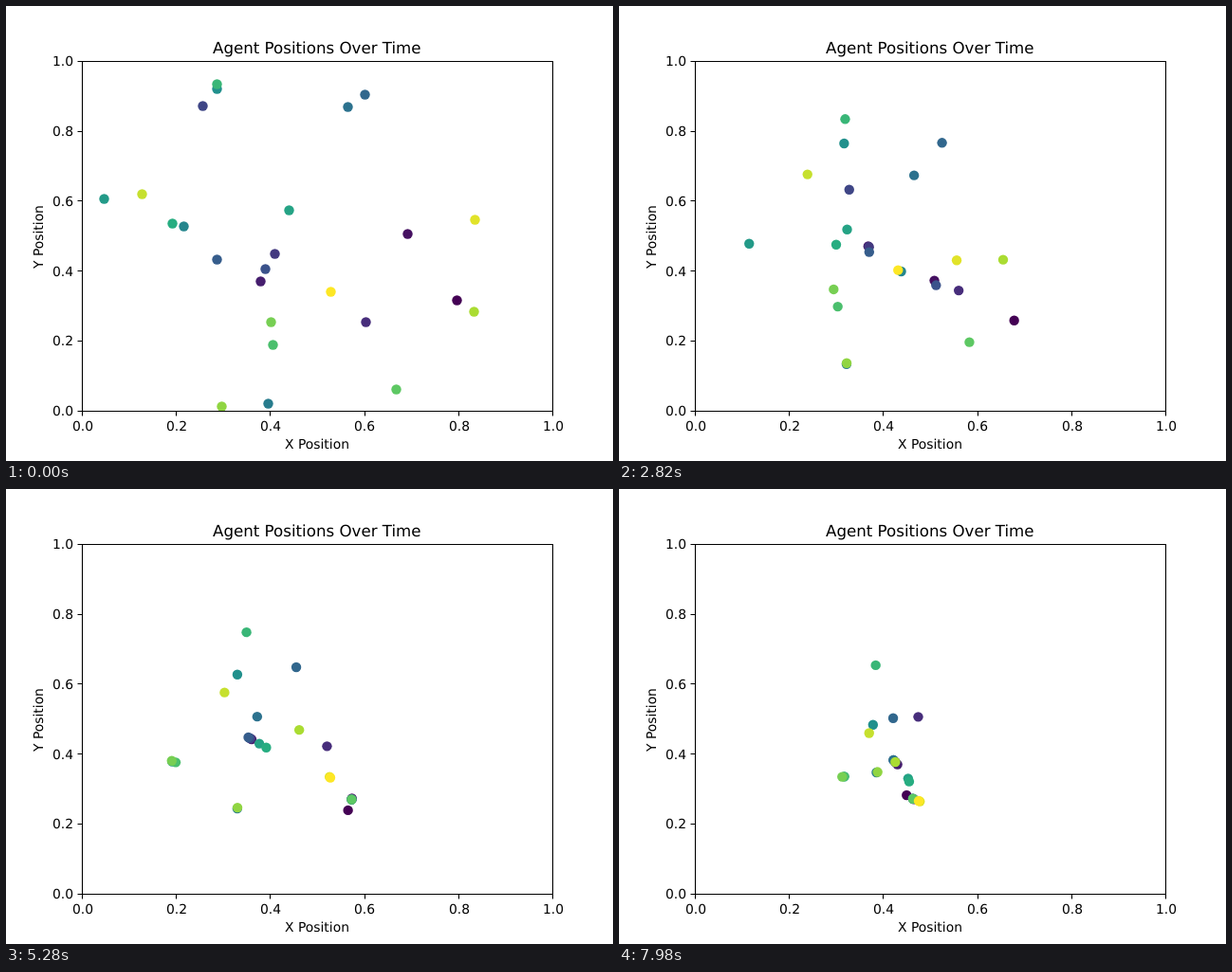
An HTML page for the animation above (8000 ms loop, 640 by 480 pixels).

```html
<!DOCTYPE html>
<html lang="en">
<head>
<meta charset="utf-8">
<title>Agent Positions Over Time</title>
<style>
  html, body { margin: 0; width: 100%; height: 100%; overflow: hidden; background: #fff; }
  svg { display: block; width: 100vw; height: 100vh; }
  text { font: 13.889px "DejaVu Sans", sans-serif; text-rendering: geometricPrecision; }
  .title { font-size: 16.667px; }
  .axes { fill: none; stroke: #000; stroke-width: 1.11; }
</style>
</head>
<body>
<svg viewBox="0 0 640 480"></svg>
<script>
const LOOP = 8000, STEP = 60;
const PLOT = { left: 80, bottom: 427.2, width: 496, height: 369.6 };
const RAMP = ["#440154", "#472d7b", "#3b528b", "#2c728e", "#21908c", "#27ad81", "#5dc863", "#aadc32", "#fde725"];

// Start of the chase: pixel x, pixel y, speed (1e-5 axis units per step), index of the prey
const AGENTS = [
  [475, 310, 281, 20], [423, 240, 510, 6], [268, 290, 224, 14], [379, 333, 213, 16], [283, 261, 215, 2],
  [207, 105, 530, 4], [273, 277, 280, 0], [222, 267, 210, 4], [378, 93, 335, 7], [360, 106, 467, 7],
  [276, 419, 398, 20], [187, 232, 546, 6], [222, 87, 337, 2], [103, 203, 308, 10], [298, 215, 283, 15],
  [175, 229, 263, 11], [222, 82, 223, 24], [281, 357, 319, 13], [411, 404, 340, 6], [279, 333, 303, 13],
  [227, 422, 269, 2], [493, 322, 495, 5], [143, 198, 298, 5], [494, 225, 648, 24], [342, 301, 293, 11]
];

const svg = document.querySelector("svg");

function add(tag, attrs, content = "") {
  const node = document.createElementNS("http://www.w3.org/2000/svg", tag);
  for (const key in attrs) node.setAttribute(key, attrs[key]);
  node.textContent = content;
  return svg.appendChild(node);
}

const toX = x => PLOT.left + x * PLOT.width;
const toY = y => PLOT.bottom - y * PLOT.height;
const snap = v => Math.round(v) + 0.5;

// Colour at position 0..1 along the ramp
function rampColor(position) {
  const place = position * (RAMP.length - 1);
  const low = Math.min(Math.floor(place), RAMP.length - 2);
  const channel = at => {
    const [a, b] = [RAMP[low], RAMP[low + 1]].map(hex => parseInt(hex.slice(at, at + 2), 16));
    return Math.round(a + (b - a) * (place - low));
  };
  return `rgb(${channel(1)}, ${channel(3)}, ${channel(5)})`;
}

// Every agent walks at its own constant speed straight at its prey's current place
function simulate(steps) {
  const agents = AGENTS.map(([px, py, speed, prey]) => ({
    x: (px + 0.5 - PLOT.left) / PLOT.width,
    y: (PLOT.bottom - py - 0.5) / PLOT.height,
    speed: speed / 1e5,
    prey
  }));
  const history = [];
  for (let i = 0; i < steps; i++) {
    history.push(agents.map(a => [toX(a.x), toY(a.y)]));
    for (const a of agents) {
      const prey = agents[a.prey];
      const dx = prey.x - a.x, dy = prey.y - a.y;
      const distance = Math.hypot(dx, dy);
      const part = distance > a.speed ? a.speed / distance : 1;
      a.x += dx * part;
      a.y += dy * part;
    }
  }
  return history;
}

const dots = AGENTS.map((_, i) => add("circle", { r: 5.2, fill: rampColor(i / (AGENTS.length - 1)) }));

let axes = `M${snap(toX(0))} ${snap(toY(0))}H${snap(toX(1))}V${snap(toY(1))}H${snap(toX(0))}Z`;
for (let i = 0; i <= 5; i++) {
  const value = i / 5, x = toX(value), y = toY(value), label = value.toFixed(1);
  axes += `M${snap(x)} ${snap(toY(0))}v5M${snap(toX(0))} ${snap(y)}h-5`;
  add("text", { x: Math.round(x - 10.1), y: 448 }, label);
  add("text", { x: 49, y: Math.round(y + 5.2) }, label);
}
add("path", { d: axes, class: "axes" });
add("text", { x: 218, y: 50, class: "title" }, "Agent Positions Over Time");
add("text", { x: 294, y: 467 }, "X Position");
add("text", { transform: "translate(39 277) rotate(-90)" }, "Y Position");

const history = simulate(Math.ceil(LOOP / STEP));
const start = performance.now();

function draw() {
  const time = Math.max(0, performance.now() - start) % LOOP;
  history[Math.floor(time / STEP)].forEach(([x, y], i) => {
    dots[i].setAttribute("cx", x);
    dots[i].setAttribute("cy", y);
  });
  requestAnimationFrame(draw);
}
draw();
</script>
</body>
</html>
```
